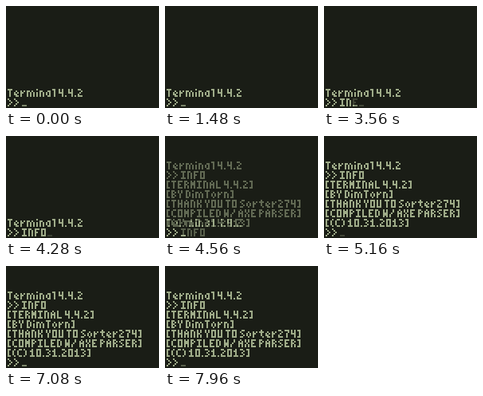
An HTML page with a canvas for the animation above (8000 ms loop, 192 px wide and 128 px high).

```html
<!DOCTYPE html>
<html lang="en">
<head>
<meta charset="utf-8">
<title>Calculator terminal</title>
<style>
html, body { margin: 0; width: 100%; height: 100%; overflow: hidden; background: #1a1d16; }
canvas { display: block; width: 192px; height: 128px; }
</style>
</head>
<body>
<canvas id="lcd" width="192" height="128" role="img" aria-label="Terminal 4.4.2: the command INFO is typed and answered"></canvas>
<script>
const LOOP = 8000, TICK = 40, FADE = 200;
const BACK = [26, 29, 22], INK = [158, 171, 136];
const GLOW = `rgb(${INK.map((c, i) => c - BACK[i])})`;

// Pen strokes of the small calculator font: points are "xy", strokes are split by spaces.
const STROKES = {
  A: '04-01-10-21-24 02-22', B: '14-04-00-10-21-12-23-14 02-12', C: '20-10-01-03-14-24',
  D: '00-04-14-23-21-10-00', E: '20-00-04-24 02-12', F: '20-00-04 02-12',
  H: '00-04 20-24 02-22', I: '00-20 10-14 04-24', K: '00-04 20-21-12-23-24 02-12',
  L: '00-04-24', M: '00-04 20-24 11-12', N: '04-00-10-21-24', O: '00-04-24-20-00',
  P: '04-00-10-21-12-02', R: '04-00-10-21-12-23-24 02-12', S: '20-10-01-12-23-14-04',
  T: '00-20 10-14', U: '00-04-24-20', W: '00-04 20-24 12-13',
  X: '00-01-12-23-24 20-21-12-03-04', Y: '00-01-12-14 20-21-12',
  a: '21-11-02-03-14-24 21-24', e: '11-02-03-14-24 11-22-13', i: '00 02-04',
  l: '00-10-14', m: '04-01-11-22-24 22-31-42-44', n: '04-01-11-22-24',
  o: '11-02-03-14-23-22-11', r: '01-04 21-12', t: '10-13-24 01-21',
  0: '00-04-24-20-00', 1: '01-10-14 04-24', 2: '00-10-21-12-03-04-24',
  3: '00-10-21-12-23-14-04', 4: '00-02-22 20-24', 7: '00-20-21-12-14',
  '.': '04', '[': '10-00-04-14', ']': '00-10-14-04', '(': '10-01-03-14', ')': '00-11-13-04',
  '/': '20-21-12-03-04', '>': '00-22-04', '_': '04-24'
};

function addGlyph(path, char, x, y) {
  let right = 0;
  for (const stroke of STROKES[char].split(' ')) {
    const points = stroke.split('-').map(p => [+p[0], +p[1]]);
    points.forEach(([px, py], i) => {
      const [qx, qy] = points[i + 1] || [px, py];
      const steps = Math.max(Math.abs(qx - px), Math.abs(qy - py));
      for (let s = 0; s <= steps; s++) {
        const k = steps ? s / steps : 0;
        path.rect(x + px + (qx - px) * k, y + py + (qy - py) * k, 1, 1);
      }
      right = Math.max(right, px);
    });
  }
  return right + 2;
}

function write(lines, x, y) {
  const path = new Path2D();
  lines.forEach((line, row) => {
    let cx = x;
    for (const char of line) cx += char === ' ' ? 1 : addGlyph(path, char, cx, y + row * 6);
  });
  return path;
}

const PROMPT_Y = 58, ENTER = 4520;
const layers = [];
const show = (lines, x, y, from, to) => layers.push({ path: write(lines, x, y), from, to });

show(['Terminal 4.4.2', '>>'], 1, 52, -LOOP, ENTER);
[['I', 2760], ['N', 3280], ['F', 3560], ['O', 3920]].forEach(([char, time], i) =>
  show([char], 10 + i * 4, PROMPT_Y, time, ENTER));
show([
  'Terminal 4.4.2',
  '>> INFO',
  '[TERMINAL 4.4.2]',
  '[BY DimTorn]',
  '[THANK YOU TO Sorter274]',
  '[COMPILED W/ AXE PARSER]',
  '[(C) 10.31.2013]',
  '>>'
], 1, 16, ENTER, 2 * LOOP);

// Cursor: column, lit from, lit until
[
  [10, -80, 240], [10, 560, 840], [10, 1160, 1480], [10, 1760, 2080], [10, 2380, 2680],
  [14, 2760, 2980], [18, 3280, 3560], [22, 3560, 3840], [26, 3920, 4200],
  [10, 4520, 4820], [10, 5160, 5460], [10, 5760, 6080], [10, 6380, 6680],
  [10, 7000, 7300], [10, 7600, 7920]
].forEach(([x, from, to]) => show(['_'], x, PROMPT_Y, from, to));

const ctx = document.getElementById('lcd').getContext('2d');
ctx.scale(2, 2);

// The slow display eases into every change.
function settled(time, since) {
  const progress = Math.min(1, Math.max(0, (time + TICK - since) / FADE));
  return 1 - (1 - progress) ** 1.5;
}

function draw() {
  const time = Math.floor(performance.now() % LOOP / TICK) * TICK;
  ctx.globalCompositeOperation = 'source-over';
  ctx.globalAlpha = 1;
  ctx.fillStyle = `rgb(${BACK})`;
  ctx.fillRect(0, 0, 96, 64);
  ctx.globalCompositeOperation = 'lighter';
  ctx.fillStyle = GLOW;
  for (const { path, from, to } of layers) {
    const level = settled(time, from) - settled(time, to);
    if (level <= 0) continue;
    ctx.globalAlpha = level;
    ctx.fill(path);
  }
  requestAnimationFrame(draw);
}
draw();
</script>
</body>
</html>
```
